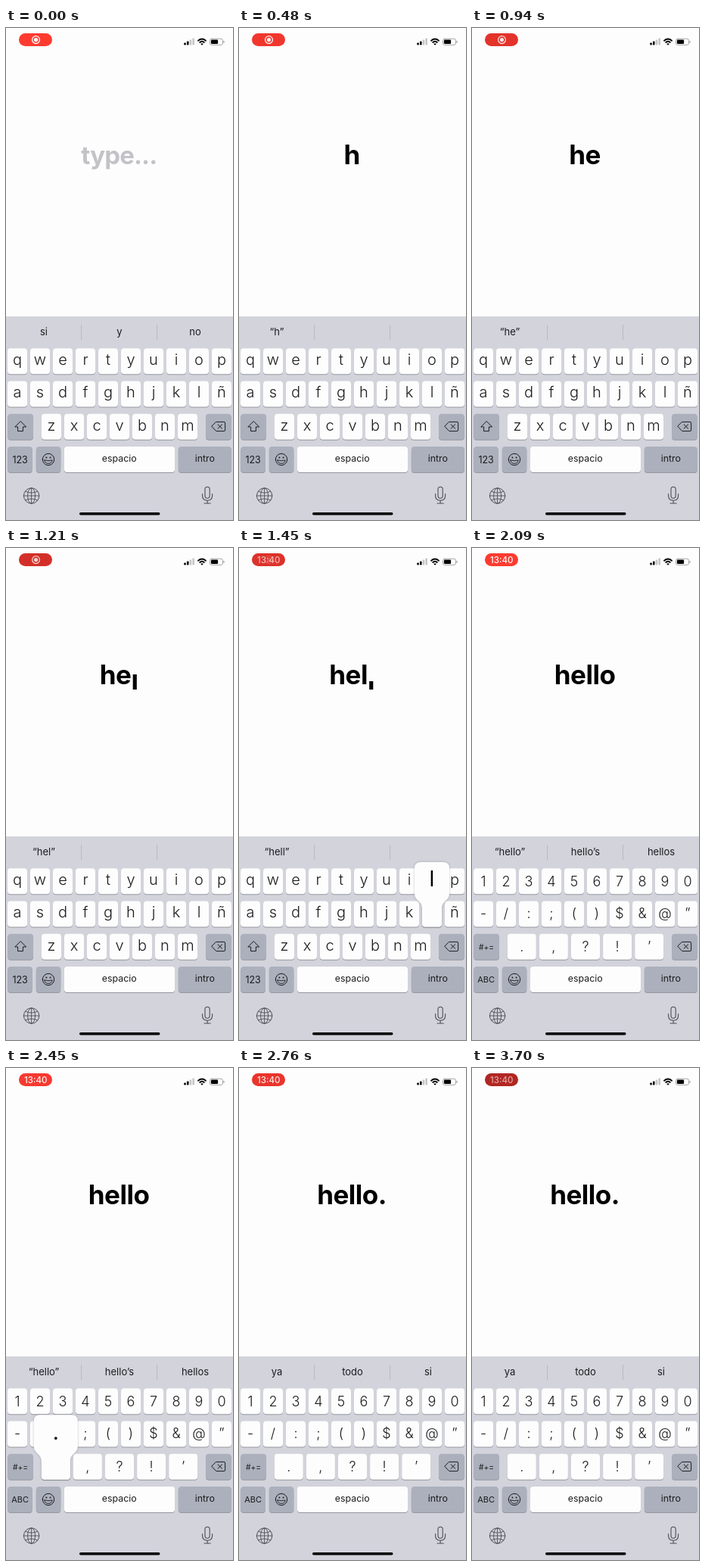
These frames come from a looping animation (300x650 px, 3730 ms). An HTML page with a canvas:

```html
<!DOCTYPE html>
<html lang="es">
<head>
<meta charset="utf-8">
<title>Typing on a phone</title>
<style>
html, body { margin: 0; width: 100%; height: 100%; overflow: hidden; background: #fff; }
canvas { display: block; }
</style>
</head>
<body>
<canvas id="stage" width="300" height="650"></canvas>
<script>
const ctx = document.getElementById('stage').getContext('2d');
const LOOP = 3730, SLIDE = 180, LINGER = 45;
const ROWS = [423.2, 466.4, 509.8, 553];
const KEY_H = 34, DARK = '#abb0bc', INK = '#1c1c1e', WHITE = '#fefdfe';

// Each key press: its key, when it goes down and when the letter is entered.
const presses = [
  { ch: 'h', x: 165, row: 1, w: 26, down: 130, enter: 230 },
  { ch: 'e', x: 75, row: 0, w: 26, down: 590, enter: 690 },
  { ch: 'l', x: 255, row: 1, w: 26, down: 1040, enter: 1140 },
  { ch: 'l', x: 255, row: 1, w: 26, down: 1330, enter: 1416 },
  { ch: 'o', x: 255, row: 0, w: 26, down: 1465, enter: 1515 },
  { ch: '.', x: 65.8, row: 2, w: 38, down: 2370, enter: 2540 }
];
const SYMBOLS_AT = 2010;

const suggestions = [
  [0, 'si', 'y', 'no'], [230, '“h”'], [690, '“he”'], [1140, '“hel”'], [1416, '“hell”'],
  [1515, '“hello”'], [1960, '“hello”', 'hello’s', 'hellos'], [2580, 'ya', 'todo', 'si']
];

// Dimming of the recording badge over time.
const pulse = [[0, 0], [940, .36], [1200, .56], [1450, .44], [1700, .06],
  [2300, 0], [2760, .28], [3300, .72], [LOOP, 1]];

const clamp = v => Math.max(0, Math.min(1, v));

function track(points, t) {
  const i = points.findIndex(p => p[0] > t);
  const [t0, a] = points[i - 1], [t1, b] = points[i];
  return a + (b - a) * (t - t0) / (t1 - t0);
}

function text(s, x, y, size, weight = 400, color = INK, align = 'center') {
  ctx.font = `${weight} ${size}px Inter, "Liberation Sans", sans-serif`;
  ctx.textAlign = align;
  ctx.fillStyle = color;
  ctx.fillText(s, x, y);
}

function box(x, y, w, h, r, color) {
  ctx.fillStyle = color;
  ctx.beginPath();
  ctx.roundRect(x, y, w, h, r);
  ctx.fill();
}

function line(d, color = INK, width = 1) {
  ctx.strokeStyle = color;
  ctx.lineWidth = width;
  ctx.lineCap = ctx.lineJoin = 'round';
  ctx.stroke(new Path2D(d));
}

function shape(d, color = INK) {
  ctx.fillStyle = color;
  ctx.fill(new Path2D(d));
}

const circle = (x, y, r) => `M${x - r} ${y}a${r} ${r} 0 1 1 ${2 * r} 0a${r} ${r} 0 1 1 ${-2 * r} 0z`;

function key(x, row, w, color = WHITE) {
  const y = ROWS[row];
  box(x, y + 1, w, KEY_H, 4, '#94979f');
  box(x, y, w, KEY_H, 4, color);
}

function labelled(labels, row, first, pitch, w, size, baseline) {
  [...labels].forEach((s, i) => {
    const x = first + i * pitch;
    key(x - w / 2, row, w);
    text(s, x, Math.round(ROWS[row] + baseline), size, 300);
  });
}

function badge(t) {
  const dim = track(pulse, t), time = clamp((t - 1300) / 190);
  const mix = (a, b) => Math.round(a + (b - a) * dim);
  box(17, 7, 44, 17, 8.5, `rgb(${mix(255, 176)},${mix(59, 38)},${mix(48, 34)})`);
  const light = 1 - .42 * dim;
  ctx.globalAlpha = light * (1 - time);
  line(circle(39.5, 15.6, 4.9), '#fff', 1.3);
  shape(circle(39.5, 15.6, 2.6), '#fff');
  ctx.globalAlpha = light * time;
  text('13:40', 39.2, 19.8, 11.5, 500, '#fff');
  ctx.globalAlpha = 1;
}

function statusBar() {
  for (let i = 0; i < 4; i++) {
    const h = 3 + 2 * i;
    box(235.3 + 3.7 * i, 22.5 - h, 2.5, h, .7, i < 2 ? '#000' : '#c4c4c6');
  }
  line('M254 16.7Q259 12.3 264 16.7', '#000', 1.9);
  line('M256.2 19Q259 16.6 261.8 19', '#000', 1.8);
  shape('M257.2 20.9Q259 19.4 260.8 20.9L259 22.7z', '#000');
  ctx.strokeStyle = '#9b9b9d';
  ctx.lineWidth = .9;
  ctx.beginPath();
  ctx.roundRect(269.5, 14.2, 17, 8.2, 2.4);
  ctx.stroke();
  box(270.9, 15.6, 9.2, 5.4, 1.2, '#000');
  box(287.4, 16.9, 1.2, 2.8, .6, '#9b9b9d');
}

function word(t) {
  const typed = presses.filter(p => p.enter <= t);
  ctx.save();
  if (!typed.length) {
    ctx.letterSpacing = '-0.9px';
    text('type...', 149.3, 180, 33, 700, '#c3c3c7');
  } else {
    ctx.beginPath();
    ctx.rect(0, 140, 300, 47);
    ctx.clip();
    ctx.font = '700 35px Inter, "Liberation Sans", sans-serif';
    ctx.letterSpacing = '-0.5px';
    const all = typed.map(p => p.ch).join('');
    const width = s => ctx.measureText(s).width;
    const x = 149.1 - width(all) / 2;
    typed.forEach((p, i) => {
      const left = 1 - clamp((t - p.enter) / SLIDE);
      const before = width(all.slice(0, i + 1)) - width(p.ch);
      text(p.ch, x + before, 180 + 34 * left * left, 35, 700, '#000', 'left');
    });
  }
  ctx.restore();
}

function icons(symbols) {
  if (!symbols) line('M19 519.8L11.8 527H15.6V532.6H22.4V527H26.2z');
  line('M277.8 520.4H288Q289.6 520.4 289.6 522V531Q289.6 532.6 288 532.6H277.8L272 526.5z');
  line('M280 523.7L285.6 529.3M285.6 523.7L280 529.3');

  line(circle(56, 570, 7.7));
  shape(circle(53.4, 567.4, 1) + circle(58.6, 567.4, 1));
  line('M50.8 570.9Q56 572.6 61.2 570.9Q60.4 575.4 56 575.4Q51.6 575.4 50.8 570.9z', INK, .9);

  const grey = '#4c4f55';
  line(circle(33.6, 618, 10.2), grey);
  line('M33.6 607.8V628.2M23.4 618H43.8M25.6 612.2Q33.6 616.2 41.6 612.2M25.6 623.8Q33.6 619.8 41.6 623.8', grey, .9);
  ctx.beginPath();
  ctx.ellipse(33.6, 618, 5, 10.2, 0, 0, 7);
  ctx.stroke();

  ctx.lineWidth = 1.1;
  ctx.beginPath();
  ctx.roundRect(263, 606.2, 6.2, 15, 3.1);
  ctx.stroke();
  line('M259.6 615.5V618Q259.6 624.2 266.1 624.2Q272.6 624.2 272.6 618V615.5M266.1 624.2V628M262 628H270.2', grey, 1.1);
}

function popup({ ch, x, row, w }) {
  const l = x - w / 2, r = x + w / 2, y = ROWS[row], top = y - 51.5, neck = y - 10;
  key(l, row, w);
  ctx.save();
  ctx.shadowColor = 'rgba(0,0,0,.24)';
  ctx.shadowBlur = 3;
  shape(`M${l - 2} ${top}H${r + 2}Q${r + 10} ${top} ${r + 10} ${top + 8}V${neck}
    C${r + 10} ${y} ${r} ${y - 1} ${r} ${y + 10}V${y + 30}Q${r} ${y + 34} ${r - 4} ${y + 34}
    H${l + 4}Q${l} ${y + 34} ${l} ${y + 30}V${y + 10}
    C${l} ${y - 1} ${l - 10} ${y} ${l - 10} ${neck}V${top + 8}Q${l - 10} ${top} ${l - 2} ${top}z`, WHITE);
  ctx.restore();
  text(ch, x, top + 32.5, 28, 400, '#000');
}

function keyboard(t) {
  const symbols = t >= SYMBOLS_AT;
  ctx.fillStyle = '#d2d3db';
  ctx.fillRect(0, 381, 300, 269);
  ctx.fillStyle = '#b8bbc3';
  ctx.fillRect(99, 392, 1, 20);
  ctx.fillRect(199, 392, 1, 20);
  const current = suggestions.filter(s => s[0] <= t).pop();
  current.slice(1).forEach((s, i) => text(s, 50 + 100 * i, 406, 13));

  if (symbols) {
    labelled('1234567890', 0, 15, 30, 26, 18, 24);
    labelled('-/:;()$&@”', 1, 15, 30, 26, 18, 23);
    labelled('.,?!’', 2, 65.8, 42.1, 38, 18, 23);
  } else {
    labelled('qwertyuiop', 0, 15, 30, 26, 20, 22);
    labelled('asdfghjklñ', 1, 15, 30, 26, 20, 22);
    labelled('zxcvbnm', 2, 60, 30, 26, 20, 22);
  }
  key(2.3, 2, 33.7, DARK);
  key(264, 2, 33.7, DARK);
  key(2.3, 3, 32.5, DARK);
  key(39.8, 3, 32.5, DARK);
  key(77, 3, 146);
  key(227.8, 3, 70, DARK);
  if (symbols) text('#+=', 19, 530.6, 10.3);
  if (symbols) text('ABC', 18.6, 574, 11);
  else text('123', 18.6, 574.5, 12.5);
  text('espacio', 149.7, 573.4, 12.4);
  text('intro', 262.8, 573.4, 12.4);
  icons(symbols);
  box(97, 640, 106.5, 3.4, 1.7, '#000');
  presses.filter(p => t >= p.down && t < p.enter + LINGER).forEach(popup);
}

function draw(now) {
  const t = now % LOOP;
  ctx.fillStyle = WHITE;
  ctx.fillRect(0, 0, 300, 650);
  badge(t);
  statusBar();
  word(t);
  keyboard(t);
}

let start;
function tick(now) {
  start ??= now;
  draw(now - start);
  requestAnimationFrame(tick);
}
draw(0);
requestAnimationFrame(tick);
</script>
</body>
</html>
```
